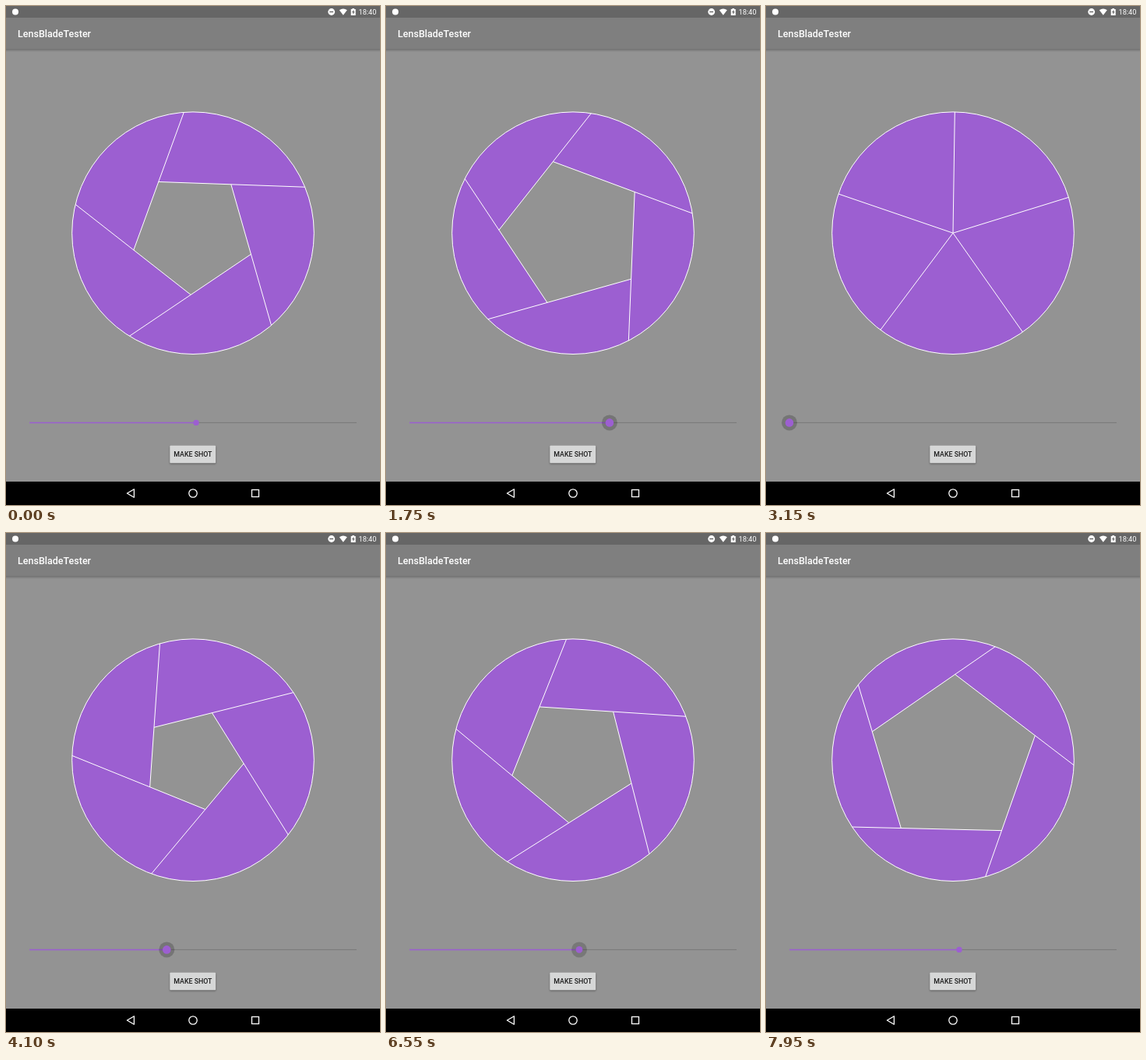
An HTML page for the animation above (8000 ms loop, 480 by 640 pixels).

```html
<!DOCTYPE html>
<html lang="en">
<head>
<meta charset="utf-8">
<title>Aperture</title>
<style>
  html, body { margin: 0; width: 100%; height: 100%; overflow: hidden; background: #939393; }
  svg { display: block; width: 480px; height: 640px; font-family: Roboto, sans-serif; }
</style>
</head>
<body>
<svg viewBox="0 0 480 640">
  <defs>
    <linearGradient id="shade" x2="0" y2="1">
      <stop offset="0" stop-opacity=".24"/>
      <stop offset="1" stop-opacity="0"/>
    </linearGradient>
    <filter id="soft" x="-20%" y="-40%" width="140%" height="190%"><feGaussianBlur stdDeviation="1"/></filter>
  </defs>
  <rect width="480" height="640" fill="#939393"/>
  <rect y="55" width="480" height="4" fill="url(#shade)"/>
  <rect width="480" height="55" fill="#7f7f7f"/>
  <rect width="480" height="15" fill="#666"/>

  <g fill="#fff">
    <circle cx="12" cy="7.5" r="4"/>
    <circle cx="417.7" cy="7.5" r="4.4"/>
    <path d="M427.8 5.2Q432.8 1.6 437.8 5.2L432.8 11.8Z"/>
    <path d="M442.7 4H444.4V3H447V4H448.7V12H442.7Z"/>
    <text x="452.5" y="11" font-size="9.2">18:40</text>
    <text x="15" y="40" font-size="12.5" font-weight="500">LensBladeTester</text>
  </g>
  <path d="M415.3 7.5H420.1" stroke="#666" stroke-width="1.4"/>
  <path d="M446.3 4.8L443.9 8.3H445.4V11L447.6 7.3H446.3Z" fill="#666"/>

  <path id="blades" fill="#9c5fd1" fill-rule="evenodd"/>
  <path id="edges" fill="none" stroke="#fff"/>
  <circle cx="240" cy="291.2" r="155.3" fill="none" stroke="#fff"/>

  <path d="M30 534.4H450" stroke="#787878"/>
  <path id="progress" stroke="#9c5fd1" stroke-width="1.5"/>
  <circle id="halo" cy="534.4" r="10"/>
  <circle id="thumb" cy="534.4" fill="#9c5fd1"/>

  <rect id="shadow" x="210.3" y="565" width="59" height="22.4" rx="1" filter="url(#soft)"/>
  <rect x="210.3" y="563.7" width="58.8" height="22.6" rx="1" fill="#d6d7d7"/>
  <rect id="press" x="210.3" y="563.7" width="58.8" height="22.6" rx="1"/>
  <text x="239.8" y="578.2" font-size="8.8" font-weight="500" text-anchor="middle" fill="#1d1d1d">MAKE SHOT</text>

  <rect y="610" width="480" height="30"/>
  <g fill="none" stroke="#fff" stroke-width="1.3">
    <path d="M155.4 625L164.4 619.8V630.2Z" stroke-linejoin="round"/>
    <circle cx="240" cy="625" r="5.2"/>
    <rect x="315.5" y="620.5" width="9" height="9"/>
  </g>
</svg>
<script>
const LOOP = 8000, CX = 240, CY = 291.2, R = 155.3, RAD = Math.PI / 180;
const $ = id => document.getElementById(id);
const set = (id, attrs) => { for (const k in attrs) $(id).setAttribute(k, attrs[k]); };
const ramp = (t, from, to) => Math.min(1, Math.max(0, (t - from) / (to - from)));

// [time in ms, slider x]
const drag = [
  [50, 244], [250, 214], [700, 328], [850, 350], [950, 357], [1300, 357],
  [1700, 296], [2150, 207], [2500, 139], [3000, 51], [3150, 30], [3550, 30],
  [4100, 206], [4400, 286], [4950, 391], [5450, 391], [5500, 387],
  [6300, 270], [6530, 248]
];
const shot = [[7220, 248], [7620, 30], [7950, 326], [8100, 450]];

// Monotone cubic through the keys, held flat outside them
function follow(keys, t) {
  const last = keys.length - 1;
  if (t <= keys[0][0]) return keys[0][1];
  if (t >= keys[last][0]) return keys[last][1];
  const i = keys.findIndex(k => k[0] > t) - 1;
  const slope = j => (keys[j + 1][1] - keys[j][1]) / (keys[j + 1][0] - keys[j][0]);
  const tangent = j => {
    if (j === 0 || j === last) return 0;
    const a = slope(j - 1), b = slope(j);
    return a * b > 0 ? 2 * a * b / (a + b) : 0;
  };
  const [t0, x0] = keys[i], [t1, x1] = keys[i + 1];
  const h = t1 - t0, u = (t - t0) / h, v = 1 - u;
  return x0 * v * v * (1 + 2 * u) + x1 * u * u * (3 - 2 * u)
    + h * u * v * (tangent(i) * v - tangent(i + 1) * u);
}

const point = (x, y) => `${x.toFixed(2)} ${y.toFixed(2)}`;

function drawIris(x) {
  const r = Math.max(0, .3702 * (x - 30));
  const base = -168.7 + .4262 * (x - 139);
  const reach = r * Math.cos(54 * RAD) + Math.sqrt(R * R - (r * Math.sin(54 * RAD)) ** 2);
  const corners = [];
  let edges = '';
  for (let i = 0; i < 5; i++) {
    const a = (base + 72 * i) * RAD, dir = a + 126 * RAD;
    const px = CX + r * Math.cos(a), py = CY + r * Math.sin(a);
    corners.push(point(px, py));
    edges += `M${point(px, py)}L${point(px + reach * Math.cos(dir), py + reach * Math.sin(dir))}`;
  }
  set('edges', { d: edges });
  set('blades', {
    d: `M${CX - R} ${CY}a${R} ${R} 0 1 1 ${2 * R} 0a${R} ${R} 0 1 1 ${-2 * R} 0ZM${corners.join('L')}Z`
  });
}

function draw(t) {
  const x = follow(drag, t);
  drawIris(t < 7150 ? x : follow(shot, t));
  set('progress', { d: `M30 534.4H${x}` });
  const held = ramp(t, 40, 180) * (1 - ramp(t, 6480, 6600));
  set('thumb', { cx: x, r: 3.7 + 1.6 * held });
  set('halo', { cx: x, 'fill-opacity': .2 * ramp(t, 40, 180) * (1 - ramp(t, 6500, 7000)) });
  const pressed = ramp(t, 7130, 7230) * (1 - ramp(t, 7300, 7600));
  set('press', { 'fill-opacity': .12 * pressed });
  set('shadow', { 'fill-opacity': .35 + .15 * pressed });
}

const start = performance.now();
function tick() {
  draw((performance.now() - start) % LOOP);
  requestAnimationFrame(tick);
}
tick();
</script>
</body>
</html>
```
